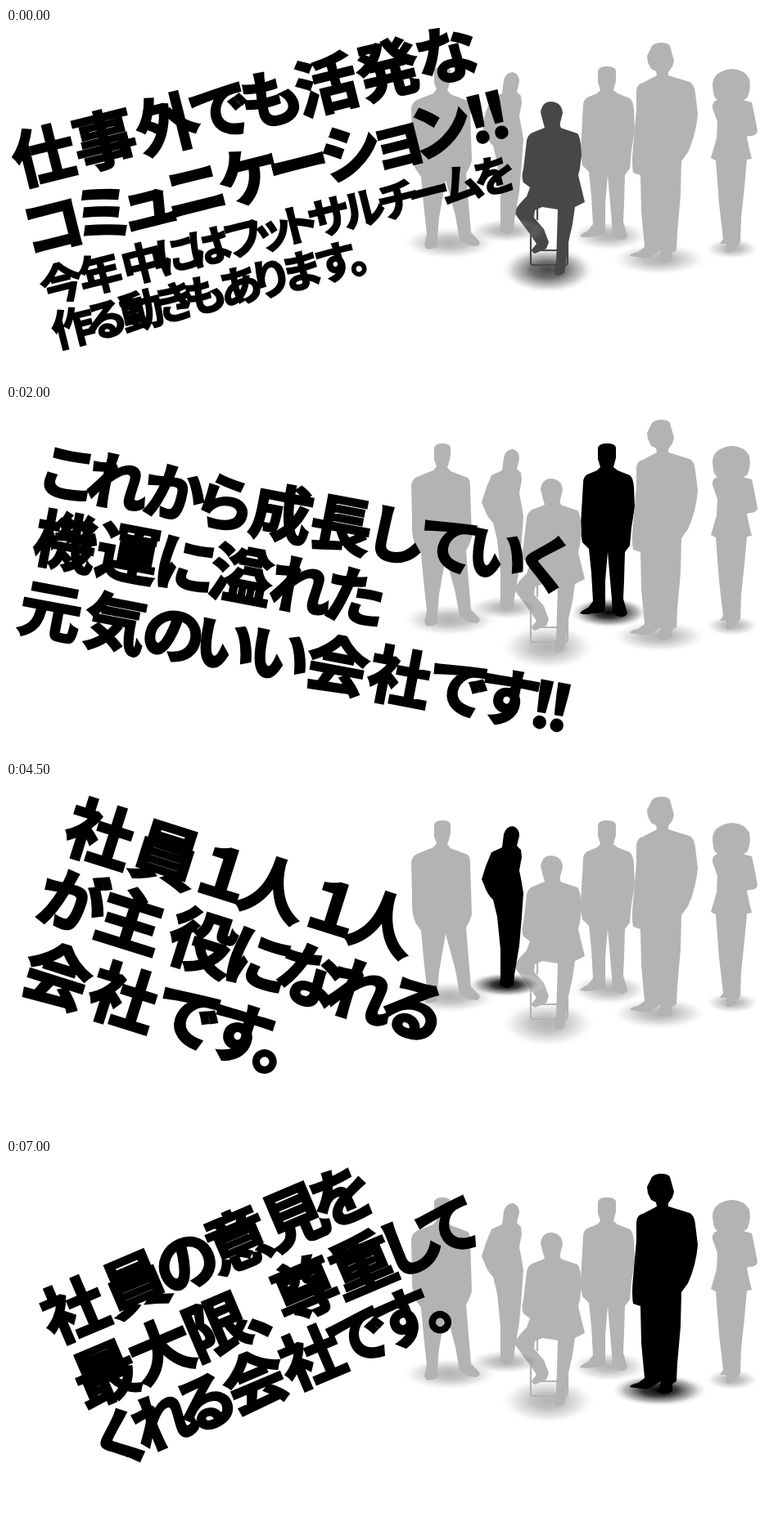
Write an HTML page that moves like this. It is 943 by 427 pixels and loops after 8000 ms.

```html
<!DOCTYPE html>
<html lang="ja">
<head>
<meta charset="utf-8">
<title>会社紹介</title>
<style>
html, body { margin: 0; width: 100%; height: 100%; overflow: hidden; background: #fff; }
svg { display: block; width: 943px; height: 427px; }
text {
  font-family: "Noto Sans CJK JP", "Noto Sans CJK", sans-serif;
  font-weight: 700;
  text-anchor: middle;
  stroke: #000;
  stroke-linejoin: miter;
}
</style>
</head>
<body>
<svg id="stage" viewBox="0 0 943 427">
  <defs>
    <radialGradient id="shade">
      <stop offset="0" stop-color="#000"/>
      <stop offset=".35" stop-color="#222" stop-opacity=".9"/>
      <stop offset=".7" stop-color="#999" stop-opacity=".7"/>
      <stop offset="1" stop-color="#fff" stop-opacity="0"/>
    </radialGradient>
  </defs>
  <g id="people"></g>
  <g id="copy"></g>
</svg>
<script>
const NS = "http://www.w3.org/2000/svg";
const LOOP = 8000, DIM = 0.3;

// shadow: cx, cy, rx, ry
const people = {
  left: {
    shadow: [542, 263, 60, 20],
    body: "M523 52Q525 47 533 47Q542 47 543 52L543 62Q541 72 539 76L543 81L564 89Q567 91 567 100L569 162Q566 172 562 178L565 215L568 250L578 261Q580 265 575 267L565 266L554 259L549 230L537 186L529 232L527 256L527 267Q521 272 513 270L511 265L514 252L510 215L507 182L500 172Q495 160 496 140L495 98Q496 91 502 88L522 80L526 75L523 67Z"
  },
  back: {
    shadow: [737, 254, 49, 19],
    body: "M723 52Q725 47 734 47Q744 47 745 52L745 65L742 76L747 80L762 86Q766 89 767 100L768 125L764 150L762 172L756 180L755 215L754 237L759 255Q757 260 749 259L741 255L740 238L735 180L732 215L732 250Q732 254 725 254L717 255Q708 257 701 255Q702 252 711 248L717 240L715 205L712 176L704 168Q701 155 703 130L705 95Q705 88 710 85L722 80L726 76L723 66Z"
  },
  woman: {
    shadow: [887, 270, 34, 13],
    body: "M864 78Q861 66 867 58Q876 50 888 50Q902 51 908 62Q910 74 907 81Q906 87 900 88L911 91L914 105L918 126Q917 132 908 132L905 133L908 148L911 160L905 161L902 195L898 232L897 262L890 272Q884 276 879 274L880 264L872 264L876 258L871 215L867 162L861 159L868 135L869 115L863 98Q862 90 869 88Q864 84 864 78Z"
  },
  tall: {
    shadow: [798, 283, 60, 20],
    body: "M789 22Q793 18 800 18Q809 18 811 22L816 40L814 47L809 54L809 58L835 66Q841 69 842 80L845 105Q843 130 833 152L825 163L824 205L820 250L819 272L814 275L814 284Q809 289 799 287L796 284L800 272L790 278Q786 283 776 281L762 279Q762 276 772 274L780 268L776 225L775 180L766 177Q764 165 766 145L770 100L770 77Q771 68 778 67L795 58L794 53L788 50L784 42L783 34Z"
  },
  seated: {
    shadow: [662, 296, 59, 29],
    lines: "M649 219V235M641 250V288Q641 290 644 290H683Q686 290 686 287V255M641 272H685",
    body: "M653 103Q655 90 666 90Q679 91 680 104L677 116Q676 122 680 123L698 129Q702 133 703 155L701 172L699 180L707 213L695 219L692 240L687 262L684 288L682 299Q678 304 671 302L669 297L672 285L673 255L674 222L655 219L646 223L645 232L657 246L663 262L660 270L646 276Q642 275 643 270L648 264L640 252L628 236L621 226Q622 220 636 206L640 195L632 189Q629 182 632 172L636 138Q637 131 643 128L658 122L656 115Z"
  },
  slim: {
    shadow: [611, 248, 48, 15],
    body: "M608 64Q611 54 619 54Q627 56 627 66L624 78L629 83L630 92L627 108Q630 122 632 136L630 165L627 200L621 236L620 248Q615 253 610 252L603 248L604 238L604 205L600 165L595 144Q588 138 584 126L581 119L586 103L593 86L606 80Z"
  }
};

// lines: font size, y of the first glyph's centre, text, centre x of each glyph
const scenes = [
  { end: 500, hot: "seated", level: 0.72, angle: -14, lines: [
    [76, 155, "仕事外でも活発な", [46, 120, 197, 262, 324, 391, 466, 538]],
    [76, 241, "コミュニケーション！！", [57, 118, 173, 231, 297, 357, 421, 478, 531, 577, 600]],
    [52, 312, "今年中にはフットサルチームを", [68, 115, 167, 208, 248, 290, 326, 357, 395, 436, 479, 516, 556, 597]],
    [52, 366, "作る動きもあります。", [82, 122, 166, 207, 243, 286, 324, 361, 403, 443]]
  ] },
  { end: 3000, hot: "back", level: 1, angle: 10.7, lines: [
    [75, 83, "これから成長していく", [77, 137, 206, 268, 337, 410, 477, 541, 600, 660]],
    [76, 167, "機運に溢れた", [73, 149, 220, 288, 361, 427]],
    [76, 252, "元気のいい会社です！！", [55, 134, 205, 268, 334, 405, 481, 553, 614, 656, 677]]
  ] },
  { end: 5500, hot: "slim", level: 1, angle: 17.5, lines: [
    [82, 63, "社員１人１人", [115, 196, 267, 327, 401, 460]],
    [82, 146, "が主役になれる", [82, 153, 240, 309, 371, 435, 498]],
    [82, 237, "会社です。", [63, 144, 222, 286, 347]]
  ] },
  { end: 8000, hot: "tall", level: 1, angle: -23, lines: [
    [78, 184, "社員の意見を", [83, 157, 220, 283, 352, 410]],
    [78, 262, "最大限、尊重して", [121, 189, 257, 323, 365, 435, 493, 541]],
    [76, 341, "くれる会社です。", [140, 192, 243, 304, 373, 431, 485, 543]]
  ] }
];

function add(parent, tag, attrs = {}) {
  const el = document.createElementNS(NS, tag);
  for (const key in attrs) el.setAttribute(key, attrs[key]);
  return parent.appendChild(el);
}

function addPerson(p) {
  const [cx, cy, rx, ry] = p.shadow;
  const g = add(document.getElementById("people"), "g");
  p.shade = add(g, "ellipse", { cx, cy, rx, ry, fill: "url(#shade)" });
  if (p.lines) p.chair = add(g, "path", { d: p.lines, fill: "none", "stroke-width": 2.2 });
  p.shape = add(g, "path", { d: p.body });
}

function addCopy(scene) {
  scene.group = add(document.getElementById("copy"), "g", { visibility: "hidden" });
  const cos = Math.cos(scene.angle * Math.PI / 180);
  for (const [size, y, text, xs] of scene.lines) {
    const el = add(scene.group, "text", {
      transform: `translate(${xs[0]} ${y}) rotate(${scene.angle})`,
      x: xs.map(x => ((x - xs[0]) / cos).toFixed(1)).join(" "),
      y: size * 0.38,
      "font-size": size,
      "stroke-width": size * 0.04
    });
    el.textContent = text;
  }
}

function setLevel(p, level) {
  const v = Math.round(255 * (1 - level));
  const color = `rgb(${v},${v},${v})`;
  p.shade.setAttribute("opacity", level);
  p.shape.setAttribute("fill", color);
  if (p.chair) p.chair.setAttribute("stroke", color);
}

let current = null;

function draw(time) {
  const t = time % LOOP;
  const scene = scenes.find(s => t < s.end);
  if (scene === current) return;
  current = scene;
  for (const s of scenes) s.group.setAttribute("visibility", s === scene ? "visible" : "hidden");
  for (const name in people) setLevel(people[name], name === scene.hot ? scene.level : DIM);
}

Object.values(people).forEach(addPerson);
scenes.forEach(addCopy);
draw(0);

let start = null;
function tick(now) {
  if (start === null) start = now;
  draw(Math.max(0, now - start));
  requestAnimationFrame(tick);
}
requestAnimationFrame(tick);
</script>
</body>
</html>
```
